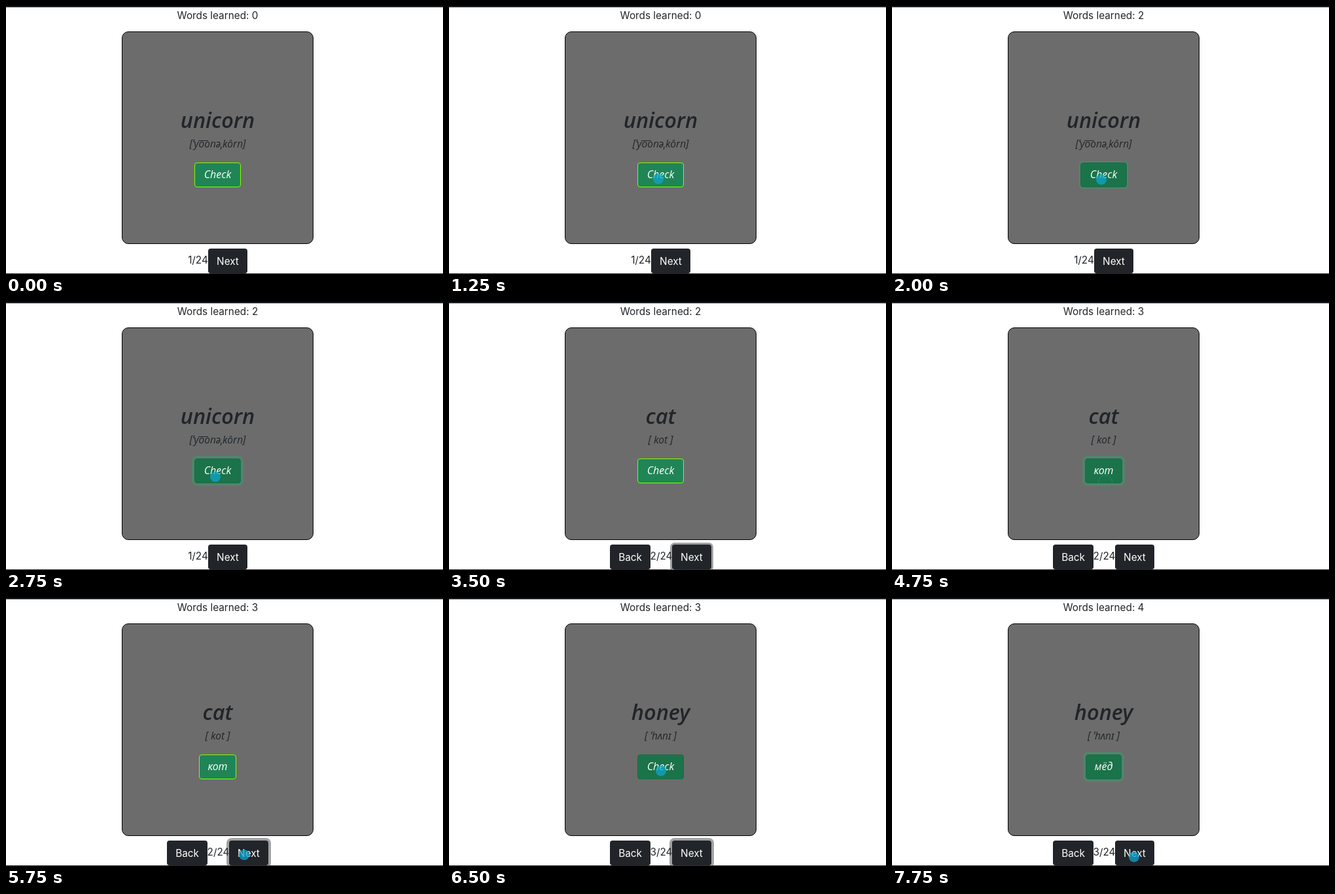
These frames come from a looping animation (668x411 px, 8 s). An HTML page:

```html
<!DOCTYPE html>
<html lang="en">
<head>
<meta charset="utf-8">
<title>Word cards</title>
<style>
  html, body { margin: 0; width: 100%; height: 100%; overflow: hidden; background: #fff; }
  svg { display: block; width: 668px; height: 411px; }
  text { font: 15.3px Inter, sans-serif; fill: #212529; text-anchor: middle; }
  .card text { font: italic 16px "Open Sans", "Noto Sans", sans-serif; }
  .card #word { font-size: 32.5px; font-weight: 600; }
  .card #sound { font-size: 15.5px; }
  .card .light, .light { fill: #fff; }
  .dark { fill: #212529; }
</style>
</head>
<body>
<svg viewBox="0 0 668 411">
  <rect class="dark" width="668" height="2"/>
  <rect class="dark" y="410" width="668" height="1"/>
  <text id="learned" x="323.5" y="20"></text>

  <g class="card">
    <rect x="177.5" y="39.5" width="292" height="325" rx="9.5" fill="#6c6c6c" stroke="#000"/>
    <text id="word" x="323.5" y="187"></text>
    <text id="sound" x="323.5" y="217"></text>
    <path id="macron" d="M294 206.5h15" stroke="#212529"/>
    <rect id="checkRing" fill="#3c996e" fill-opacity=".5"/>
    <rect id="check"/>
    <text id="checkLabel" class="light" x="323.5" y="264"></text>
  </g>

  <g id="back">
    <rect class="dark" x="246" y="372" width="62" height="38" rx="4"/>
    <text class="light" x="277" y="397">Back</text>
  </g>
  <text id="page" y="395"></text>
  <rect id="nextRing" fill="#424649" fill-opacity=".5"/>
  <rect id="next" class="dark"/>
  <text id="nextLabel" class="light" y="397">Next</text>
  <circle id="pointer"/>
</svg>

<script>
const LOOP = 8000;
const el = id => document.getElementById(id);
const set = (id, attrs) => {
  for (const name in attrs) el(id).setAttribute(name, attrs[name]);
};

const cards = [
  { word: 'unicorn', sound: '[ˈyoonəˌkôrn]', answer: 'единорог', width: 99 },
  { word: 'cat', sound: '[ kot ]', answer: 'кот', width: 57 },
  { word: 'honey', sound: '[ ˈhʌnɪ ]', answer: 'мёд', width: 55 }
];

// Each cue changes only the listed properties and holds until the next one.
const cues = [
  [0, { card: 0, learned: 0, open: false, hover: false, checkRing: 0, nextRing: 0, at: null, ripple: false }],
  [250, { at: [394, 324] }],
  [500, { at: [326, 276] }],
  [1000, { at: [322, 289] }],
  [1250, { at: [320, 265] }],
  [1500, { at: [320, 267], learned: 1, open: true, hover: true, checkRing: 4 }],
  [1750, { at: [320, 266] }],
  [2000, { learned: 2, open: false, checkRing: 2 }],
  [2250, { at: [320, 268], checkRing: 4 }],
  [3000, { at: [330, 332] }],
  [3250, { at: [346, 398] }],
  [3500, { at: [340, 417], card: 1, hover: false, checkRing: 0, nextRing: 3 }],
  [3750, { at: [335, 340], nextRing: 4 }],
  [4000, { at: [326, 272], hover: true }],
  [4250, { learned: 3, open: true, checkRing: 4, nextRing: 0 }],
  [4500, { at: [326, 276] }],
  [4750, { ripple: true }],
  [5000, { at: null, ripple: false }],
  [5250, { at: [340, 330] }],
  [5500, { at: [364, 394] }],
  [5750, { hover: false, checkRing: 0, nextRing: 4 }],
  [6000, { card: 2, open: false }],
  [6250, { at: [345, 320] }],
  [6500, { at: [324, 265], hover: true }],
  [6750, { at: [324, 268] }],
  [7000, { learned: 4, open: true, checkRing: 4, nextRing: 0 }],
  [7250, { at: [340, 310] }],
  [7500, { at: [368, 385] }],
  [7750, { at: [370, 397] }]
];

function stateAt(time) {
  return Object.assign({}, ...cues.filter(cue => cue[0] <= time).map(cue => cue[1]));
}

function drawRing(id, x, y, width, spread) {
  set(id, {
    x: x - spread, y: y - spread,
    width: width + 2 * spread, height: 38 + 2 * spread,
    rx: 4 + spread, visibility: spread ? 'visible' : 'hidden'
  });
}

function draw(time) {
  const s = stateAt(time);
  const card = cards[s.card];

  el('learned').textContent = 'Words learned: ' + s.learned;
  el('word').textContent = card.word;
  el('sound').textContent = card.sound;
  set('macron', { visibility: s.card ? 'hidden' : 'visible' });

  const width = s.open ? card.width : 71;
  const left = 323.5 - width / 2;
  const pressed = s.hover || s.checkRing > 0;
  drawRing('checkRing', left, 240, width, s.checkRing);
  set('check', {
    x: left + .5, y: 240.5, width: width - 1, height: 37, rx: 3.5,
    fill: pressed ? '#1b734a' : '#208556',
    stroke: pressed ? '#196b45' : '#7fff00'
  });
  el('checkLabel').textContent = s.open ? card.answer : 'Check';

  const nextX = s.card ? 341 : 309;
  set('back', { visibility: s.card ? 'visible' : 'hidden' });
  el('page').textContent = s.card + 1 + '/24';
  set('page', { x: s.card ? 324.5 : 293.5 });
  drawRing('nextRing', nextX, 372, 60, s.nextRing);
  set('next', { x: nextX, y: 372, width: 60, height: 38, rx: 4 });
  set('nextLabel', { x: nextX + 30 });

  const [x, y] = s.at || [0, 0];
  set('pointer', {
    cx: x, cy: y, r: s.ripple ? 10.5 : 8,
    fill: s.ripple ? 'none' : '#0ea5cd',
    stroke: s.ripple ? '#239178' : 'none',
    opacity: s.ripple ? .7 : .75,
    visibility: s.at ? 'visible' : 'hidden'
  });
}

const start = performance.now();
function tick() {
  draw((performance.now() - start) % LOOP);
  requestAnimationFrame(tick);
}
tick();
</script>
</body>
</html>
```
